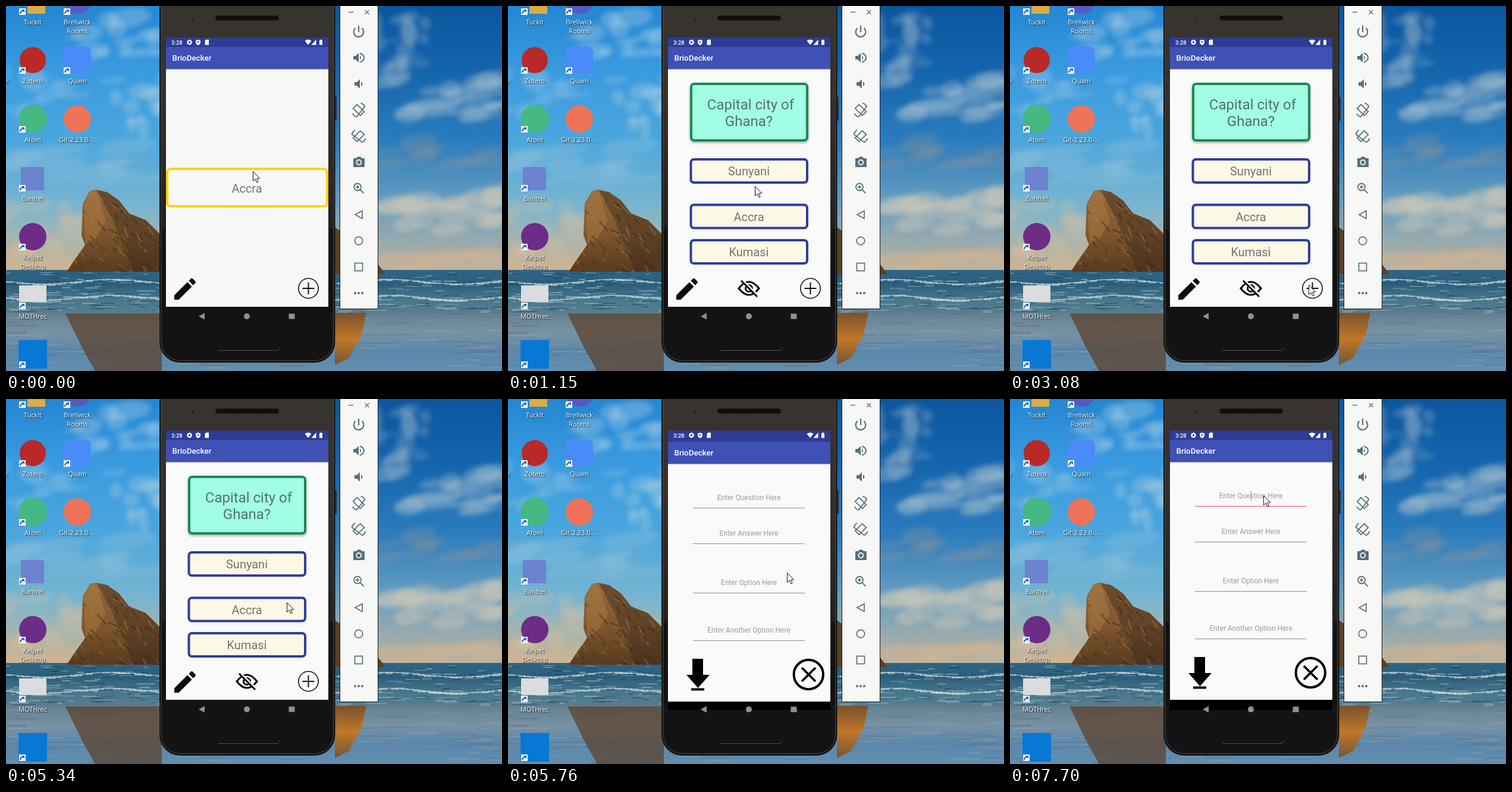
An HTML page with a canvas for the animation above (8000 ms loop, 834 by 614 pixels).

```html
<!DOCTYPE html>
<html lang="en">
<head>
<meta charset="utf-8">
<style>
html, body { margin: 0; width: 100%; height: 100%; overflow: hidden; background: #2878b8; }
canvas { display: block; }
</style>
</head>
<body>
<canvas id="stage" width="834" height="614"></canvas>
<script>
const W = 834, H = 614, LOOP = 8000;
const stage = document.getElementById('stage').getContext('2d');
const baseCanvas = document.createElement('canvas');
baseCanvas.width = W;
baseCanvas.height = H;
let c = baseCanvas.getContext('2d');

let seed = 11;
const rnd = () => (seed = seed * 16807 % 2147483647) / 2147483647;
const between = (a, b) => a + (b - a) * rnd();

function rect(x, y, w, h, fill) {
  c.fillStyle = fill;
  c.fillRect(x, y, w, h);
}
function box(x, y, w, h, r, fill, stroke, lw = 1) {
  c.beginPath();
  c.roundRect(x, y, w, h, r);
  if (fill) { c.fillStyle = fill; c.fill(); }
  if (stroke) { c.strokeStyle = stroke; c.lineWidth = lw; c.stroke(); }
}
function disc(x, y, r, fill, stroke, lw = 1) {
  c.beginPath();
  c.arc(x, y, r, 0, 7);
  if (fill) { c.fillStyle = fill; c.fill(); }
  if (stroke) { c.strokeStyle = stroke; c.lineWidth = lw; c.stroke(); }
}
function path(d, fill, stroke, lw = 1) {
  const p = new Path2D(d);
  if (fill) { c.fillStyle = fill; c.fill(p, 'evenodd'); }
  if (stroke) { c.strokeStyle = stroke; c.lineWidth = lw; c.stroke(p); }
}
function text(s, x, y, font, color, align = 'center') {
  c.font = font;
  c.fillStyle = color;
  c.textAlign = align;
  c.fillText(s, x, y);
}
function at(x, y, draw, angle = 0, scale = 1) {
  c.save();
  c.translate(x, y);
  c.rotate(angle);
  c.scale(scale, scale);
  draw();
  c.restore();
}
function fade(y0, y1, ...colors) {
  const g = c.createLinearGradient(0, y0, 0, y1);
  colors.forEach((col, i) => g.addColorStop(i / (colors.length - 1), col));
  return g;
}
const roboto = (size, weight = 400) => `${weight} ${size}px Roboto, sans-serif`;

// Desktop backdrop
function cloud(x, y, w, h, color, n = 14) {
  c.fillStyle = color;
  for (let i = 0; i < n; i++) {
    c.beginPath();
    c.ellipse(x + between(-w, w), y + between(-h, h), between(w * .15, w * .5), between(2, h * .5), -.12, 0, 7);
    c.fill();
  }
}
function sky() {
  rect(0, 0, 300, 450, fade(0, 450, '#2486d2', '#3a9be0', '#4ba6dd', '#79b5cf', '#d6b48c'));
  rect(300, 0, 534, 450, fade(0, 450, '#0b569f', '#1565ae', '#2b7cbd', '#6a9fc0', '#c3b49c'));
  c.save();
  c.filter = 'blur(4px)';
  cloud(190, 55, 75, 38, 'rgba(190,218,232,.32)');
  cloud(225, 165, 50, 45, 'rgba(190,215,226,.3)');
  cloud(60, 150, 60, 40, 'rgba(150,200,230,.25)');
  cloud(110, 265, 140, 30, 'rgba(155,200,220,.3)');
  cloud(50, 375, 80, 40, 'rgba(225,195,160,.25)');
  cloud(660, 65, 50, 48, 'rgba(165,190,205,.3)', 18);
  cloud(735, 155, 110, 34, 'rgba(185,202,210,.34)', 22);
  cloud(725, 245, 100, 24, 'rgba(120,145,165,.4)');
  cloud(740, 345, 105, 34, 'rgba(208,202,184,.45)', 22);
  cloud(740, 420, 110, 18, 'rgba(216,182,146,.4)');
  c.restore();
}
function sea() {
  rect(0, 444, W, 74, fade(444, 518, '#2e6585', '#2c5f7b', '#47778d', '#587e90'));
  for (let i = 0; i < 330; i++) {
    const y = between(447, 516), k = (y - 440) / 76;
    rect(between(-20, W), y, between(6, 20 + 25 * k), between(.7, 2),
      rnd() < .5 ? 'rgba(205,218,222,.45)' : 'rgba(20,55,80,.45)');
  }
  for (const y of [463, 490]) {
    for (let x = 0; x < W; x += 9)
      rect(x, y + 4 * Math.sin(x / 37), 11, between(1, 4), 'rgba(222,228,226,.65)');
  }
  rect(0, 516, W, 98, fade(516, 614, '#637f90', '#7892a4', '#5c87aa', '#628eaf'));
  for (let i = 0; i < 110; i++)
    rect(between(-30, W), between(517, 612), between(15, 70), between(1, 3),
      rnd() < .5 ? 'rgba(170,178,180,.22)' : 'rgba(70,85,100,.22)');
}
function rocks() {
  path('M102 447L116 426 133 402 127 386 129 333 141 311 153 309 170 313 190 327 207 349 235 360 262 387V447Z',
    fade(309, 447, '#90683c', '#80582f', '#593b20'));
  path('M153 310L170 313 190 327 207 349 235 360 262 387V447H215L196 402 180 362Z', 'rgba(55,40,28,.42)');
  path('M131 335L141 311 152 312 168 362 150 392 133 400Z', 'rgba(190,135,70,.35)');
  c.save();
  c.clip(new Path2D('M102 447L133 402 129 333 145 312 170 313 207 349 262 387V447Z'));
  for (let i = 0; i < 70; i++) {
    const x = between(110, 260), y = between(318, 445);
    path(`M${x} ${y}l${between(4, 16)} ${between(5, 18)}`, null,
      rnd() < .5 ? 'rgba(45,30,20,.4)' : 'rgba(195,145,85,.3)', between(1, 3));
  }
  c.restore();
  path('M553 372L600 405 626 435 638 451H553Z', '#5b4028');
  // wet sand reflections
  path('M100 517H262V614H150L128 575Z', 'rgba(92,65,42,.72)');
  path('M553 516H606L598 552 577 592 553 604Z', fade(516, 604, '#7b512d', '#c07828', '#755438'));
}

// Desktop icons
const labelFont = '11px "Open Sans", "Noto Sans", sans-serif';
function label(s, x, y) {
  c.save();
  c.shadowColor = '#000';
  c.shadowBlur = 2;
  c.shadowOffsetX = c.shadowOffsetY = 1;
  text(s, x, y, labelFont, '#fff');
  c.restore();
}
function shortcut(x, y) {
  rect(x, y, 11, 11, '#f4f6f8');
  path(`M${x + 2} ${y + 9}Q${x + 2} ${y + 5} ${x + 7} ${y + 4}`, null, '#1b62b5', 2);
  path(`M${x + 4} ${y + 2}h5v5z`, '#1b62b5');
}
function desktopIcons() {
  rect(36, -24, 30, 37, '#d9ad45');
  disc(121, -11, 24, '#555bc4');
  disc(45, 91, 22, '#b92927');
  box(97, 68, 46, 46, 9, '#4a8cf7');
  disc(45, 190, 24, '#45b883');
  disc(120, 190, 23, '#ee7358');
  rect(25, 271, 39, 39, '#6d82cf');
  disc(45, 388, 23, '#6d2c86');
  rect(22, 470, 46, 28, '#dadcdd');
  rect(21, 562, 48, 48, '#0878d4');
  for (let i = 0; i < 7; i++) shortcut(22, 4 + 99 * i);
  shortcut(97, 4);
  shortcut(97, 103);
  label('Tuckit', 45, 31);
  label('Brellwick', 120, 31);
  label('Rooms', 120, 46);
  label('Zotero', 45, 130);
  label('Quam', 120, 130);
  label('Atom', 45, 229);
  label('Git-2.23.0-...', 120, 229);
  label('Bantrel', 45, 328);
  label('Kelpet', 45, 427);
  label('Desktop', 45, 442);
  label('MOTHrec', 45, 526);
  label('e', 0, 130);
  label('.', 1, 245);
}

// Emulator
function navIcons() {
  path('M324 522L334 516.5V527.5Z', '#909090');
  disc(405, 522, 5, '#909090');
  rect(475.5, 517.5, 10, 9, '#909090');
}
function phone() {
  rect(552, 153, 4, 40, '#302e2d');
  box(259, -60, 293.5, 659, 34, fade(0, 600, '#383430', '#33302d', '#292725', '#171717', '#131313'), '#151515', 2);
  box(261, -60, 289.5, 656.5, 32, null, '#4a4744', 1);
  path('M264.5 375V515M547.5 375V515', null, '#111', 5);
  rect(266, 506, 279, 70, '#131313');
  box(352, 16, 107, 8.5, 4, '#151311');
  for (let x = 354; x < 458; x += 4)
    for (let y = 18; y < 24; y += 3) rect(x + y % 2 * 2, y, 1.5, 1.5, '#000');
  disc(314, 22, 1.8, '#1c1c20');
  path('M357 579.5H457Q460 579.5 460 574', null, '#4c4c4c', 1);
  navIcons();
}
function tablet() {
  c.strokeRect(-4.7, -8.5, 9.4, 17);
  c.beginPath();
  c.arc(0, 0, 12, -.5, .25);
  c.moveTo(12, 3);
  c.arc(0, 0, 12, 2.64, 3.39);
  c.stroke();
}
function toolbar() {
  const ink = '#566f7e';
  box(561.5, -5, 64, 514.5, 0, '#f7f8f5', '#151515', 1);
  c.strokeStyle = ink;
  c.lineWidth = 2;
  path('M576 10.5H584M603.5 7l7 7m0-7l-7 7', null, ink, 1.3);
  c.beginPath();
  c.arc(593, 43.5, 8.4, -.85, 3.99);
  c.moveTo(593, 33);
  c.lineTo(593, 44);
  c.lineWidth = 2.2;
  c.stroke();
  path('M584 84v6h4l5 5V79l-5 5z', ink);
  path('M595 83.5q4 3.5 0 7z', ink);
  path('M595 79.5q7 2 7 7.5t-7 7.5', null, ink, 2);
  path('M586 128v6h4l5 5V123l-5 5z', ink);
  path('M597 127q5 4 0 8z', ink);
  c.lineWidth = 1.8;
  at(593, 175, tablet, -Math.PI / 4);
  at(593, 219, tablet, Math.PI / 4);
  path('M585 256h4l2-2.5h5l2 2.5h4q1 0 1 1v13q0 1-1 1h-17q-1 0-1-1v-13q0-1 1-1z', ink);
  disc(593.3, 263, 4, null, '#f7f8f5', 1.8);
  disc(591, 304.5, 6, null, ink, 1.8);
  path('M595.5 309l6 6M588 304.5h6m-3-3v6', null, ink, 1.8);
  path('M587 351L599 344.5V357.5Z', null, ink, 1.7);
  disc(593, 395, 6.7, null, ink, 1.7);
  c.strokeRect(586.5, 432.5, 13, 13);
  for (const x of [587, 593, 599]) disc(x, 483, 2, ink);
}

// App
function statusBar() {
  text('3:28', 278, 64.5, roboto(9.5, 500), '#fff', 'left');
  disc(308.5, 61, 2.8, null, '#fff', 2);
  for (let i = 0; i < 8; i++)
    at(308.5, 61, () => rect(-.8, -4.6, 1.6, 2, '#fff'), i * Math.PI / 4);
  path('M319 58l4-1.5 4 1.5v3q0 3-4 5-4-2-4-5z', '#fff');
  disc(323, 60.5, 1.3, '#2d3c95');
  path('M336.5 56.5h4.5v9h-6.5v-7z', '#fff');
  path('M502.5 58.5q5.5-4 11 0l-5.5 7z', '#fff');
  path('M521.5 56.5v9h-8z', '#fff');
  path('M527 57.5h1.5v-1h2v1h1.5v8h-5z', '#fff');
}
function appBar(off) {
  rect(269, 53, 273, 17 + off, '#2d3c95');
  rect(269, 69 + off, 273, 37, '#3f51b5');
  rect(269, 106 + off, 273, 1, '#c3c5cf');
  rect(269, 107 + off, 273, 1, '#e9e9ec');
  text('BrioDecker', 279.5, 92 + off, roboto(13.4, 500), '#fff', 'left');
}
function bottomIcons() {
  at(277, 452, () => path('M3 17.25V21h3.75L17.8 9.95l-3.75-3.75zM20.7 7.05q.6-.7 0-1.4l-2.35-2.35q-.7-.6-1.4 0l-1.8 1.8 3.75 3.75z', '#0c0c0c'), 0, 2);
  disc(508.5, 475, 16.7, null, '#111', 1.6);
  path('M498.5 475h20m-10-10v20', null, '#111', 2);
}
function answerScreen() {
  rect(269, 53, 273, 453, '#f7f8f6');
  appBar(0);
  box(271, 274, 269, 63, 6, '#f8f8f7', '#ffd400', 4);
  text('Accra', 405, 314, roboto(20), '#757575');
  bottomIcons();
}
function option(s, y) {
  box(307.5, y + 2, 195.5, 39, 5, '#fcf8e6', '#2e3d9e', 4);
  text(s, 405, y + 29, roboto(20), '#74746f');
}
function quizScreen(off) {
  rect(269, 53, 273, 453, '#fafafa');
  appBar(off);
  c.save();
  c.translate(0, off);
  c.save();
  c.shadowColor = 'rgba(0,0,0,.35)';
  c.shadowBlur = 4;
  c.shadowOffsetY = 2;
  box(306, 129, 199, 99, 7, '#198a50');
  c.restore();
  box(310, 133, 191, 91, 3, '#a2ffe5');
  text('Capital city of', 408, 174, roboto(24), '#51736a');
  text('Ghana?', 405, 202, roboto(24), '#51736a');
  option('Sunyani', 256);
  option('Accra', 332.5);
  option('Kumasi', 392);
  bottomIcons();
  path('M388 475q17-22 34 0-17 22-34 0z', null, '#0c0c0c', 3.2);
  disc(405, 475, 5.5, null, '#0c0c0c', 3);
  path('M394.5 461l27 27', null, '#fafafa', 3);
  path('M392 462l27 27', null, '#0c0c0c', 3);
  c.restore();
}
function field(s, y, focus) {
  text(s, 405, y + 4.3, roboto(12), '#9b9b9b');
  rect(311, y + 17, 188, 1, focus ? '#f04a86' : '#8d8d8d');
}
function formScreen(off, focus) {
  rect(269, 53, 273, 453 + off, '#fafafa');
  appBar(off);
  c.save();
  c.translate(0, off);
  field('Enter Question Here', 163, focus);
  field('Enter Answer Here', 223);
  field('Enter Option Here', 306);
  field('Enter Another Option Here', 386);
  if (focus) rect(404.8, 155, 1, 16, '#d0597f');
  path('M310 434h18v27h11l-19.5 22-19.5-22h10zM308 483.5h22v4h-22z', '#000');
  disc(505.3, 460.5, 24.7, null, '#000', 4);
  path('M494 449l23 23m0-23l-23 23', null, '#000', 3.8);
  c.restore();
}
function clipTo(y0, y1, draw) {
  c.save();
  c.beginPath();
  c.rect(269, y0, 273, y1 - y0);
  c.clip();
  draw();
  c.restore();
}
function app(t) {
  if (t < 1150) answerScreen();
  else if (t < 5620) quizScreen(0);
  else if (t < 5760) {
    clipTo(53, 212, () => {
      quizScreen(-1.5);
      rect(269, 53, 273, 160, 'rgba(0,0,0,.09)');
    });
    clipTo(212, 522, () => formScreen(17, false));
  } else {
    rect(269, 506, 273, 17, '#000');
    formScreen(t < 5880 ? 3 : t < 6000 ? 1 : 0, t >= 7550);
    navIcons();
  }
  statusBar();
}

// Pointer: time, x, y
const moves = [
  [0, 415, 278], [150, 415, 299], [290, 415, 303], [1580, 416, 301], [1730, 424, 286],
  [1870, 419, 342], [2000, 412, 398], [2300, 433, 386], [2420, 455, 373], [2560, 480, 424],
  [2680, 497, 454], [2830, 500, 463], [2960, 501, 467], [3080, 502, 469], [5060, 485, 400],
  [5190, 475, 357], [5340, 472, 342], [5760, 469, 292], [5880, 469, 285], [6000, 469, 282],
  [6270, 440, 210], [6400, 426, 173], [6550, 426, 162]
];
function pointer(t) {
  const [, x, y] = moves.findLast(m => m[0] <= t);
  at(x + .5, y + .5, () => path('M0 0V16L3.7 12.6 6.3 18.3 8.7 17.3 6.2 11.6H11.2Z', '#fff', '#111', 1));
}

sky();
sea();
rocks();
desktopIcons();
phone();
toolbar();
c = stage;

const start = performance.now();
function frame() {
  const t = (performance.now() - start) % LOOP;
  c.drawImage(baseCanvas, 0, 0);
  app(t);
  pointer(t);
  requestAnimationFrame(frame);
}
frame();
</script>
</body>
</html>
```
